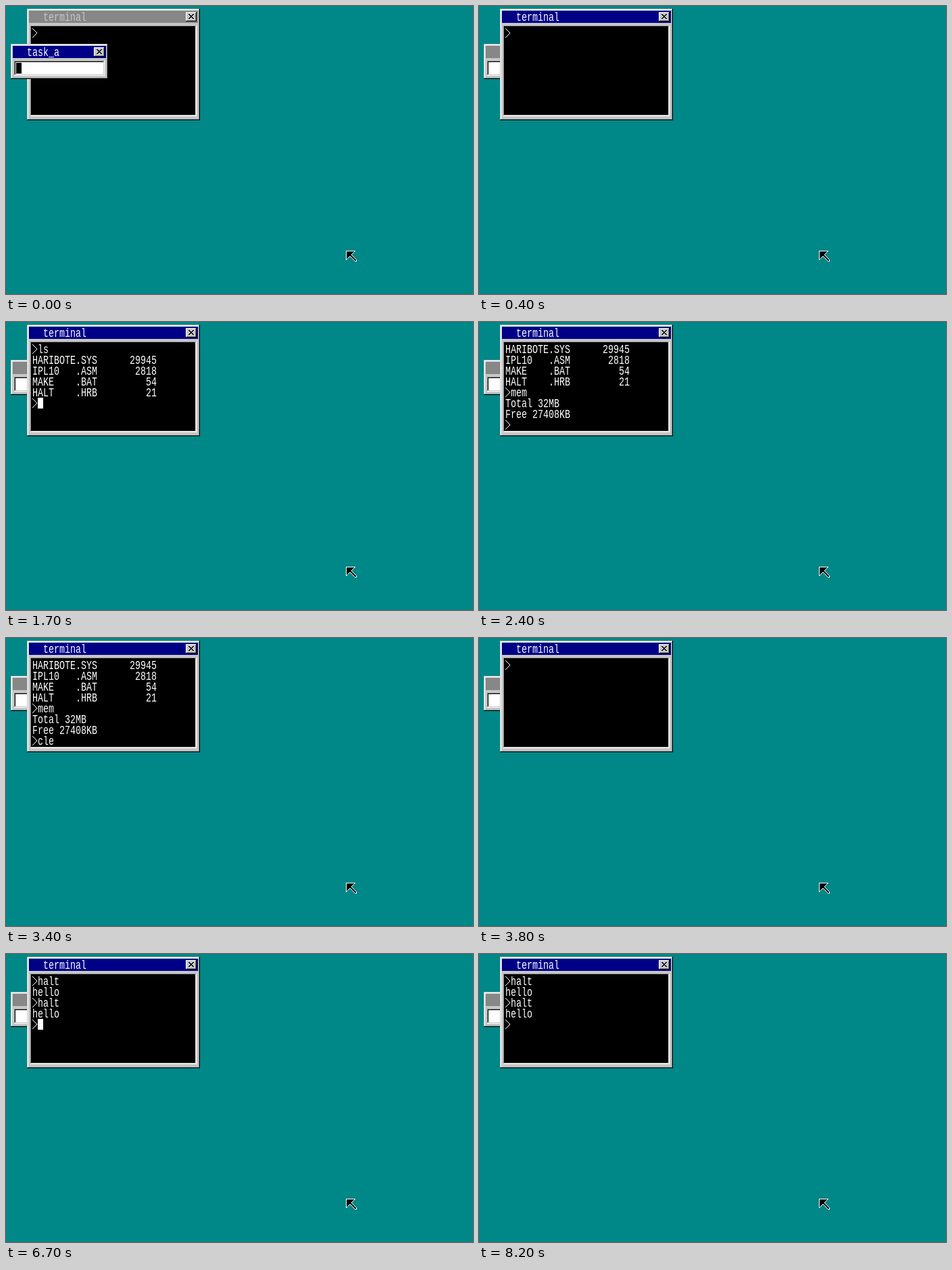
An HTML page for the animation above (8500 ms loop, 691x426 px).

```html
<!DOCTYPE html>
<html lang="en">
<head>
<meta charset="utf-8">
<title>Desktop terminal</title>
<style>
  html, body { margin: 0; width: 100%; height: 100%; overflow: hidden; background: #008787; }
  svg { display: block; width: 691px; height: 426px; shape-rendering: crispEdges; }
  text { font: 13.333px "Liberation Mono", monospace; white-space: pre; }
</style>
</head>
<body>
<svg id="stage" viewBox="0 0 691 426"></svg>
<script>
const LOOP = 8500, FOCUS_SWAP = 400, BLINK = 500;
const BLACK = '#000', WHITE = '#fff', LIGHT = '#c7c7c7', DARK = '#878787', NAVY = '#000087', TEAL = '#008787';
const ROWS = 8, CELL_W = 8, CELL_H = 16;
const stage = document.getElementById('stage');

function add(parent, tag, attrs) {
  const node = document.createElementNS('http://www.w3.org/2000/svg', tag);
  for (const key in attrs) node.setAttribute(key, attrs[key]);
  return parent.appendChild(node);
}
const rect = (parent, x, y, width, height, fill) => add(parent, 'rect', { x, y, width, height, fill });
const group = (parent, x, y) => add(parent, 'g', { transform: `translate(${x} ${y})` });

// Tall console lettering in 8 by 16 cells
function label(parent, x, y, fill, content = '') {
  const node = add(parent, 'text', { transform: `translate(${x} ${y + 14}) scale(1 1.32)`, fill });
  node.textContent = content;
  return node;
}

function closeButton(parent, x, y) {
  const g = group(parent, x, y);
  rect(g, 0, 0, 16, 14, BLACK);
  rect(g, 0, 0, 15, 13, WHITE);
  rect(g, 1, 1, 14, 12, DARK);
  rect(g, 1, 1, 13, 11, LIGHT);
  for (let i = 0; i < 7; i++) {
    rect(g, 4 + i, 3 + i, 2, 1, BLACK);
    rect(g, 10 - i, 3 + i, 2, 1, BLACK);
  }
}

function makeWindow(x, y, w, h, title) {
  const g = group(stage, x, y);
  rect(g, 0, 0, w, h, BLACK);
  rect(g, 0, 0, w - 1, h - 1, LIGHT);
  rect(g, 1, 1, w - 2, h - 2, DARK);
  rect(g, 1, 1, w - 3, h - 3, WHITE);
  rect(g, 2, 2, w - 4, h - 4, LIGHT);
  const bar = rect(g, 3, 3, w - 6, 18, NAVY);
  const name = label(g, 24, 4, WHITE, title);
  closeButton(g, w - 21, 5);
  return {
    g,
    focus(on) {
      bar.setAttribute('fill', on ? NAVY : DARK);
      name.setAttribute('fill', on ? WHITE : LIGHT);
    }
  };
}

function textBox(g, w, h, fill) {
  rect(g, 5, 25, w + 6, h + 6, WHITE);
  rect(g, 5, 25, w + 5, h + 5, DARK);
  rect(g, 6, 26, w + 4, h + 4, LIGHT);
  rect(g, 6, 26, w + 3, h + 3, BLACK);
  rect(g, 7, 27, w + 2, h + 2, fill);
}

function drawPointer(x, y) {
  const g = group(stage, x, y);
  for (let r = 0; r < 16; r++) {
    const end = Math.min(16, r < 6 ? 14 - r : r + 3);
    if (r < 8) {
      rect(g, 0, r, end, 1, WHITE);
      if (r) rect(g, 1, r, end - 2, 1, BLACK);
      continue;
    }
    if (r < 14) rect(g, 0, r, 14 - r, 1, WHITE);
    if (r < 12) rect(g, 1, r, 12 - r, 1, BLACK);
    rect(g, r - 2, r, end - r + 2, 1, WHITE);
    if (r < 15) rect(g, r - 1, r, end - r, 1, BLACK);
  }
}

// Scene
rect(stage, 0, 0, 691, 426, TEAL);
const terminal = makeWindow(31, 4, 256, 165, 'terminal');
textBox(terminal.g, 240, 128, BLACK);
const task = makeWindow(7, 56, 144, 52, 'task_a');
textBox(task.g, 128, 16, WHITE);
const taskCursor = rect(task.g, 8, 28, CELL_W, CELL_H, BLACK);
drawPointer(503, 362);

const screen = group(terminal.g, 8, 28);
let chevron = '';
for (let i = 0; i < 14; i++) chevron += `M${Math.min(i, 13 - i)} ${i + 1}h1v1h-1z`;
const rows = Array.from({ length: ROWS }, (_, i) => ({
  prompt: add(screen, 'path', { d: chevron, fill: WHITE, transform: `translate(0 ${i * CELL_H})` }),
  text: label(screen, 0, i * CELL_H, WHITE)
}));
const cursor = rect(screen, 0, 0, CELL_W, CELL_H, WHITE);

// Shell
const file = (name, ext, size) => `${name.padEnd(8)}.${ext}` + String(size).padStart(11);
const output = {
  ls: [file('HARIBOTE', 'SYS', 29945), file('IPL10', 'ASM', 2818), file('MAKE', 'BAT', 54), file('HALT', 'HRB', 21)],
  mem: ['Total 32MB', 'Free 27408KB'],
  halt: ['hello']
};
const keys = [
  [1200, 'l'], [1400, 's'], [1500, '\n'],
  [2000, 'm'], [2100, 'e'], [2200, 'm'], [2400, '\n'],
  [3100, 'c'], [3300, 'l'], [3400, 'e'], [3500, 'a'], [3600, 'r'], [3800, '\n'],
  [4800, 'h'], [4900, 'a'], [5000, 'lt'], [5100, '\n'],
  [5400, 'h'], [5600, 'a'], [5700, 'l'], [5900, 't'], [6000, '\n']
];

function shellAt(t) {
  let lines = ['>'], lastKey = 0;
  for (const [time, key] of keys) {
    if (time > t) break;
    lastKey = time;
    if (key !== '\n') {
      lines[lines.length - 1] += key;
      continue;
    }
    const command = lines[lines.length - 1].slice(1);
    lines = command === 'clear' ? ['>'] : [...lines, ...output[command], '>'].slice(-ROWS);
  }
  return { lines, lastKey };
}

function show(node, on) {
  node.setAttribute('visibility', on ? 'inherit' : 'hidden');
}

let taskOnTop = null;
function render(t) {
  const taskFocused = t < FOCUS_SWAP;
  if (taskFocused !== taskOnTop) {
    taskOnTop = taskFocused;
    stage.insertBefore(...(taskFocused ? [terminal.g, task.g] : [task.g, terminal.g]));
    task.focus(taskFocused);
    terminal.focus(!taskFocused);
  }
  show(taskCursor, t < 100);

  const { lines, lastKey } = shellAt(t);
  rows.forEach((row, i) => {
    const line = lines[i] || '';
    const isPrompt = line[0] === '>';
    const content = isPrompt ? ' ' + line.slice(1) : line;
    show(row.prompt, isPrompt);
    if (row.text.textContent !== content) row.text.textContent = content;
  });

  // A key press hides the cursor until its next blink
  const beat = Math.floor((t - 200) / BLINK);
  show(cursor, beat % 2 === 1 && lastKey < beat * BLINK + 200);
  cursor.setAttribute('x', lines[lines.length - 1].length * CELL_W);
  cursor.setAttribute('y', (lines.length - 1) * CELL_H);
}

const start = performance.now();
function tick() {
  render((performance.now() - start) % LOOP);
  requestAnimationFrame(tick);
}
tick();
</script>
</body>
</html>
```
